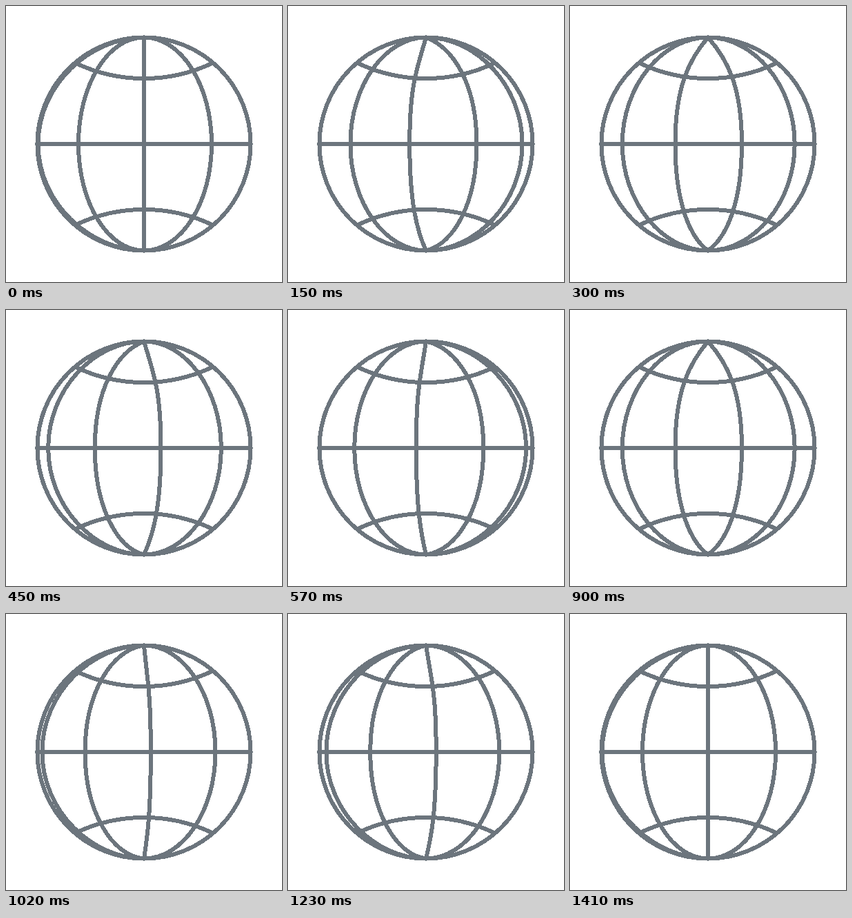
An HTML page for the animation above (1440 ms loop, 400 by 400 pixels).

```html
<!DOCTYPE html>
<html lang="en">
<head>
<meta charset="utf-8">
<title>Spinning globe</title>
<style>
  html, body { margin: 0; width: 100%; height: 100%; overflow: hidden; background: #fff; }
  svg { display: block; width: 100%; height: 100%; }
  g { fill: none; stroke: #6c757d; stroke-width: 6; stroke-linecap: round; shape-rendering: crispEdges; }
</style>
</head>
<body>
<svg viewBox="0 0 400 400">
  <g id="globe" transform="translate(200 200)">
    <circle r="154.55"/>
    <path d="M-154.5 0H154.5" stroke-linecap="butt"/>
    <path d="M-99.7 -117.5A231.3 231.3 0 0 0 99.7 -117.5M-99.7 117.5A231.3 231.3 0 0 1 99.7 117.5" stroke-linecap="butt"/>
  </g>
</svg>
<script>
  const LOOP = 1440, STEP = 30, SPIN_END = 1400, SPACING = 200;
  const R = 154.5, EDGE = 153.4, K = 0.5523;
  // Equator offsets of the resting meridians, west to east.
  const stops = [-EDGE, -95, 0, 98, EDGE];
  const globe = document.getElementById('globe');
  const lerp = (a, b, p) => a + (b - a) * p;

  const meridians = stops.slice(1).map(() =>
    globe.appendChild(document.createElementNS('http://www.w3.org/2000/svg', 'path')));

  // Handles at the poles: the central meridian is straight, the outermost a little flatter.
  function pose(x) {
    if (x === 0) return { x, poleX: 0, north: -R * 0.6, south: R * 0.75 };
    const k = Math.abs(x) === EDGE ? 0.51 : K;
    return { x, poleX: x * k, north: -R, south: R };
  }

  function curve(from, to, p) {
    const a = pose(from), b = pose(to), mid = R * K;
    const [x, px, north, south] = ['x', 'poleX', 'north', 'south']
      .map(key => lerp(a[key], b[key], p).toFixed(3));
    return `M0 ${-R}C${px} ${north} ${x} ${-mid} ${x} 0C${x} ${mid} ${px} ${south} 0 ${R}`;
  }

  function draw(time) {
    const t = Math.floor((time % LOOP) / STEP) * STEP;
    const phase = Math.min(t, SPIN_END) / SPACING % 1;
    meridians.forEach((path, i) =>
      path.setAttribute('d', curve(stops[i], stops[i + 1], phase)));
  }

  const start = performance.now();
  function tick() {
    draw(performance.now() - start);
    requestAnimationFrame(tick);
  }
  tick();
</script>
</body>
</html>
```
